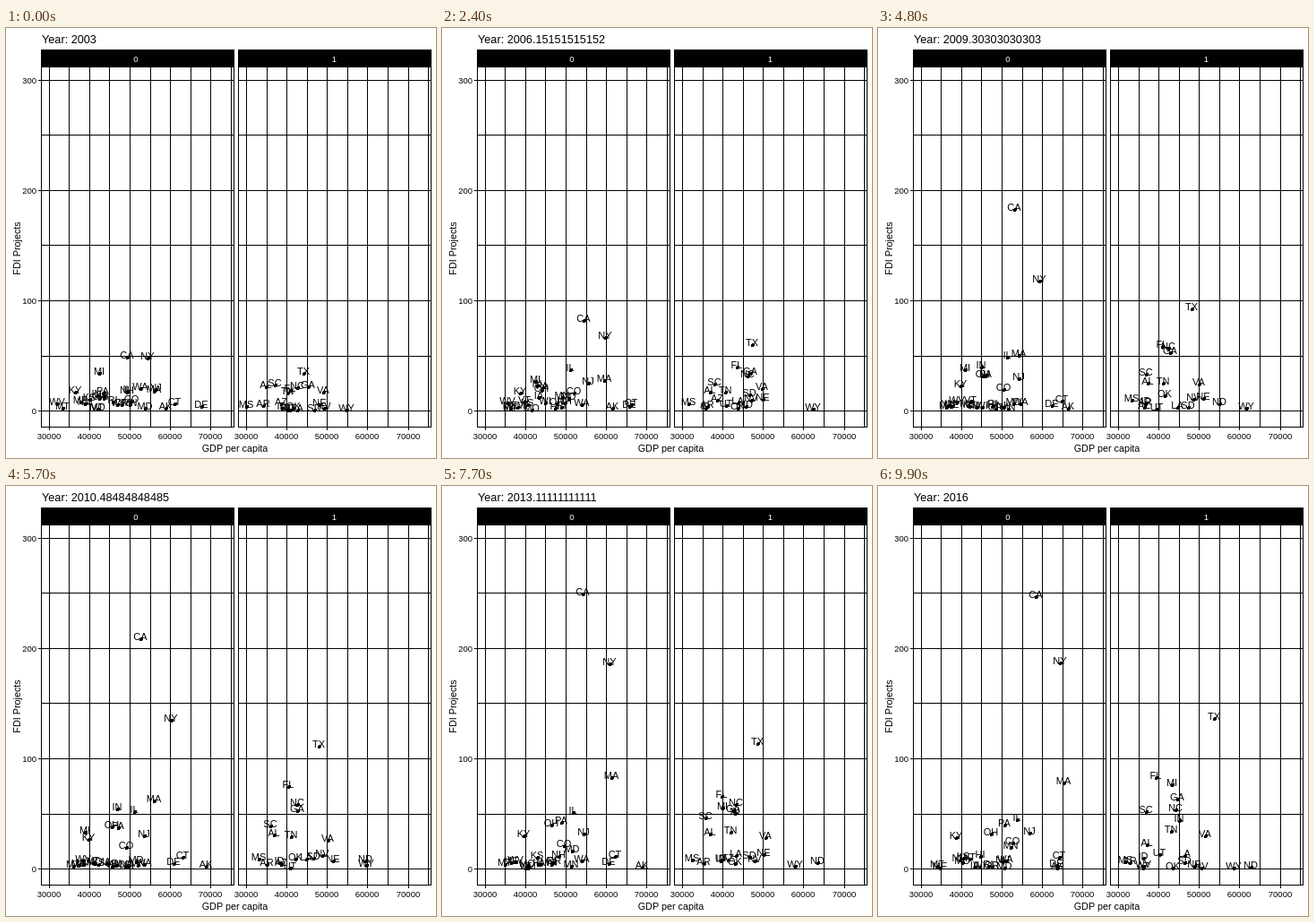
Recreate the animation shown at these times as an HTML page. Size 480x480 px, loop 10 s.

```html
<!DOCTYPE html>
<html lang="en">
<head>
<meta charset="utf-8">
<title>FDI projects by GDP per capita</title>
<style>
html, body { margin: 0; width: 100%; height: 100%; overflow: hidden; background: #fff; }
svg { display: block; width: 480px; height: 480px; font-family: "Liberation Sans", Arial, sans-serif; }
line, rect, circle { shape-rendering: crispEdges; }
line { stroke: #000; stroke-width: 1; }
.frame { fill: none; stroke: #000; }
.tick { font-size: 9.5px; }
.axis { font-size: 10.8px; text-anchor: middle; }
.mid { text-anchor: middle; }
.end { text-anchor: end; }
.white { fill: #fff; }
.state { font-size: 11px; text-anchor: middle; }
#year { font-size: 12.7px; }
</style>
</head>
<body>
<svg viewBox="0 0 480 480">
  <text id="year" x="40" y="17"></text>
  <g id="grid"></g>
  <g id="dots"></g>
  <g id="labels"></g>
  <text class="axis" x="255.5" y="473">GDP per capita</text>
  <text class="axis" transform="translate(16 246) rotate(-90)">FDI Projects</text>
</svg>
<script>
const byId = id => document.getElementById(id);
const grid = byId('grid');
const PANEL_GAP = 220, FRAMES = 100, FRAME_MS = 100;
const FIRST = 2003, LAST = 2016;

function make(parent, tag, attrs, text) {
  const el = document.createElementNS('http://www.w3.org/2000/svg', tag);
  for (const k in attrs) el.setAttribute(k, attrs[k]);
  if (text !== undefined) el.textContent = text;
  parent.appendChild(el);
  return el;
}
const rule = (x1, y1, x2, y2) => make(grid, 'line', { x1, y1, x2, y2 });

function drawPanel(n) {
  const left = 39.5 + n * PANEL_GAP;
  for (let i = 0; i < 10; i++) {
    const x = Math.floor(48.2 + i * 22.57 + n * 220.3) + 0.5;
    const major = i % 2 === 0;
    rule(x, 43, x, major ? 449 : 445);
    if (major) make(grid, 'text', { class: 'tick mid', x: x - 0.5, y: 459 }, 30000 + i * 5000);
  }
  for (let i = 0; i < 7; i++) {
    const y = Math.floor(427.55 - i * 61.54) + 0.5;
    const major = i % 2 === 0;
    rule(major && !n ? 36 : left, y, left + 215, y);
    if (major && !n) make(grid, 'text', { class: 'tick end', x: 34, y: y + 3.5 }, i * 50);
  }
  make(grid, 'rect', { class: 'frame', x: left, y: 43.5, width: 215, height: 402 });
  make(grid, 'rect', { x: left - 0.5, y: 24, width: 216, height: 20 });
  make(grid, 'text', { class: 'tick mid white', x: 145 + n * 221.5, y: 38 }, n);
}
drawPanel(0);
drawPanel(1);

const tracks = [];

// Points are spread evenly over the years the track is visible.
function addTrack(panel, name, points, from = FIRST, to = LAST) {
  tracks.push({
    panel, points, from, to,
    dot: make(byId('dots'), 'circle', { r: 2 }),
    label: make(byId('labels'), 'text', { class: 'state' }, name)
  });
}
function lead(panel, name, path, from, to) {
  addTrack(panel, name, path.split(' ').map(p => p.split(',').map(Number)), from, to);
}

let seed = 11;
const random = () => (seed = seed * 16807 % 2147483647) / 2147483647;

// Small states, poorest first, wander just above the zero line.
function crowd(panel, names, left, right) {
  names.split(' ').forEach((name, i, all) => {
    const rank = i / (all.length - 1);
    const home = left + (right - left) * rank;
    const points = Array.from({ length: 7 }, () =>
      [home + (random() - 0.5) * 24, 427 - random() ** 2 * (12 + 14 * rank)]);
    addTrack(panel, name, points);
  });
}

lead(0, 'CA', '136,368 159,333 154,211 147,131', FIRST, 2012);
lead(0, 'CA', '154,202 158,126 163,52 177,124', 2011.5);
lead(0, 'NY', '159,369 183,349 180,288 190,236', FIRST, 2012);
lead(0, 'NY', '187,257 188,203 191,145 204,198', 2011.5);
lead(0, 'MI', '105,386 105,397 102,379 82,392', FIRST, 2011.5);
lead(0, 'IN', '102,411 106,401 112,388 132,346', FIRST, 2011.5);
lead(0, 'WV', '58,420 89,418 79,422', FIRST, 2015.5);
lead(0, 'MA', '166,406 182,394 156,364 188,325 208,332');
lead(0, 'IL', '136,406 147,373 143,361 156,373');
lead(0, 'OH', '105,414 115,401 121,374 127,389');
lead(0, 'PA', '109,408 114,400 130,375 142,379');
lead(0, 'KY', '78,407 92,408 94,390 88,393');
lead(0, 'NJ', '168,404 162,394 153,390 170,388');
lead(0, 'CO', '141,417 150,405 130,403 151,399');
lead(0, 'CT', '189,420 220,421 190,413 203,415');
lead(0, 'DE', '219,423 207,423 181,421 200,424');
lead(0, 'AK', '179,425 195,425 235,425 201,427');
crowd(0, 'MT ME NM VT KS MO IA WI HI RI OR NH MN MD WA', 76, 152);

lead(1, 'TX', '113,386 127,358 131,326 129,272', FIRST, 2011.5);
lead(1, 'TX', '132,290 134,287 156,260', 2012);
lead(1, 'FL', '98,405 111,381 99,366 94,320', FIRST, 2011.5);
lead(1, 'FL', '92,350 93,345 91,326', 2012);
lead(1, 'MI', '94,363 94,359 109,334', 2011.5);
lead(1, 'IN', '106,365 109,366 117,374', 2011.5);
lead(1, 'WV', '77,424 77,425', 2015.5);
lead(1, 'GA', '118,401 125,386 106,362 105,365 115,350');
lead(1, 'NC', '106,402 122,389 104,356 109,355 113,362');
lead(1, 'SC', '81,399 86,397 72,374 80,364');
lead(1, 'AL', '71,401 84,409 79,383 81,401');
lead(1, 'TN', '95,408 98,406 100,387 108,386');
lead(1, 'VA', '135,407 139,402 140,394 146,391');
lead(1, 'WY', '161,427 208,425 173,424 178,427');
lead(1, 'ND', '95,427 129,422 202,418 197,426');
lead(1, 'MS', '49,423 64,416 57,420');
crowd(1, 'AR ID AZ UT OK LA SD NV NE', 72, 140);

function position({ points, from, to }, year) {
  const steps = points.length - 1;
  const at = (year - from) / (to - from) * steps;
  const i = Math.min(Math.floor(at), steps - 1);
  return points[i].map((v, k) => v + (points[i + 1][k] - v) * (at - i));
}

let shown = -1;
function draw(now) {
  const frame = Math.floor(now / FRAME_MS) % FRAMES;
  if (frame === shown) return;
  shown = frame;
  const year = FIRST + (LAST - FIRST) * frame / (FRAMES - 1);
  byId('year').textContent = 'Year: ' + Number(year.toPrecision(15));
  for (const t of tracks) {
    const visible = year >= t.from && year <= t.to;
    t.dot.style.display = t.label.style.display = visible ? '' : 'none';
    if (!visible) continue;
    const [px, py] = position(t, year).map(Math.round);
    const x = px + t.panel * PANEL_GAP;
    t.dot.setAttribute('cx', x);
    t.dot.setAttribute('cy', py);
    t.label.setAttribute('x', x - 1);
    t.label.setAttribute('y', py + 1);
  }
}

const start = performance.now();
function tick() {
  draw(performance.now() - start);
  requestAnimationFrame(tick);
}
tick();
</script>
</body>
</html>
```
